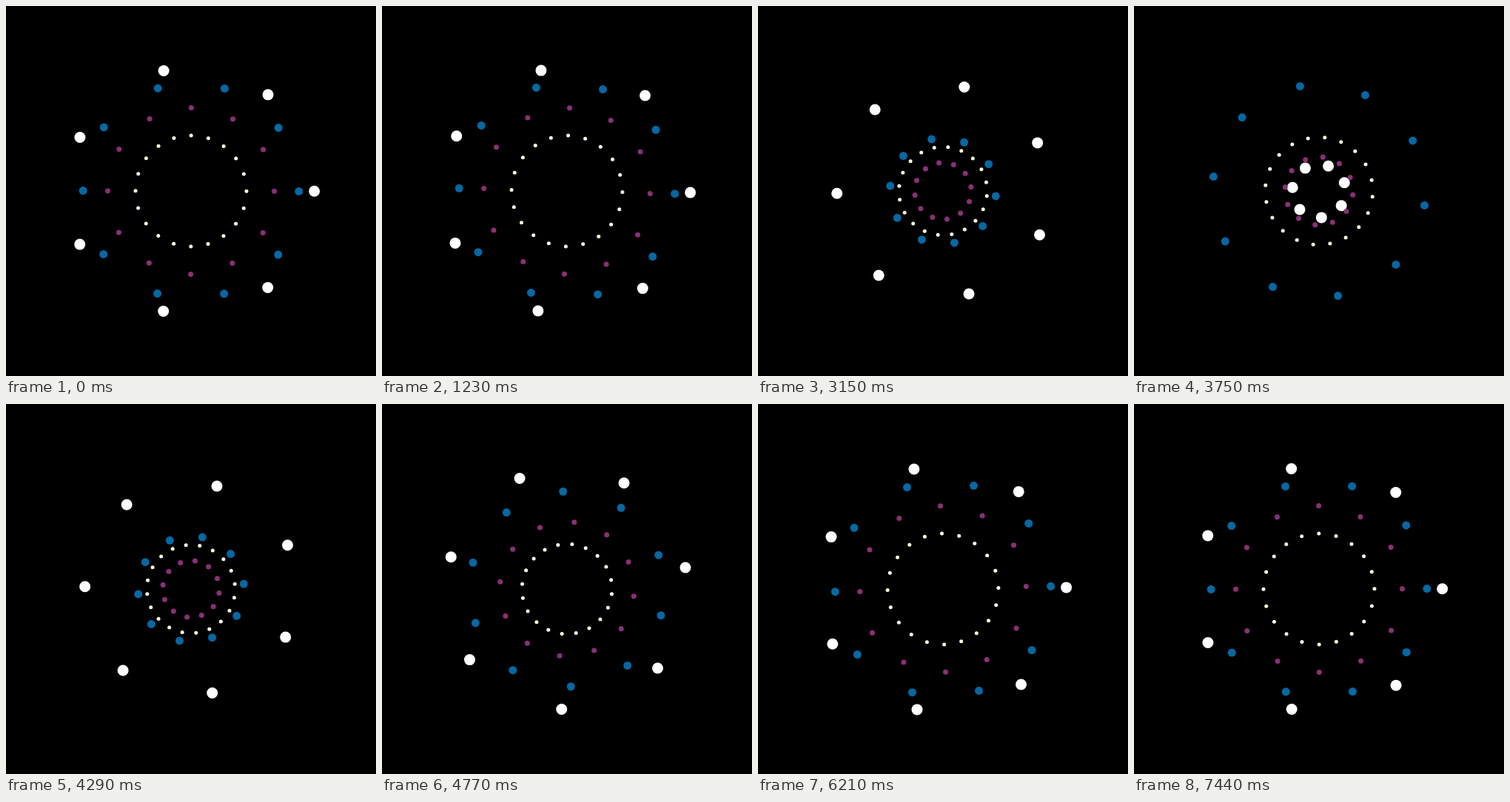
Recreate the animation shown at these times as an HTML page with a canvas. Size 500 px wide and 500 px high, loop 7.5 s.

```html
<!DOCTYPE html>
<html lang="en">
<head>
<meta charset="utf-8">
<title>Orbiting rings</title>
<style>
  html, body { margin: 0; width: 100%; height: 100%; overflow: hidden; background: #000; }
  canvas { display: block; width: 500px; height: 500px; }
</style>
</head>
<body>
<canvas id="stage" width="500" height="500"></canvas>
<script>
const ctx = document.getElementById('stage').getContext('2d');
const TAU = Math.PI * 2;
const LOOP = 7500;
const STEP = 30;
const STEPS = LOOP / STEP;

// Each dot circles a hub; the hubs sit evenly on a ring around the centre.
const rings = [
  { count: 7,  ring: 100,  orbit: 66.67, turns: 1, size: 7.5, color: '#ffffff' },
  { count: 10, ring: 87.5, orbit: 58.33, turns: 2, size: 5.5, color: '#0568a3' },
  { count: 12, ring: 75,   orbit: 37.5,  turns: 3, size: 3.5, color: '#8b2f76' },
  { count: 20, ring: 62.5, orbit: 12.5,  turns: 4, size: 2.5, color: '#ffffdd' }
];

function easeInOutExpo(p) {
  return p < 0.5 ? 2 ** (20 * p - 11) : 1 - 2 ** (9 - 20 * p);
}

function drawRing({ count, ring, orbit, turns, size, color }, progress) {
  const phase = TAU * turns * progress;
  const x = ring + orbit * Math.cos(phase);
  const y = orbit * Math.sin(phase);
  ctx.fillStyle = color;
  for (let i = 0; i < count; i++) {
    const a = TAU * i / count;
    const c = Math.cos(a), s = Math.sin(a);
    ctx.beginPath();
    ctx.arc(250 + x * c - y * s, 250 + x * s + y * c, size, 0, TAU);
    ctx.fill();
  }
}

function draw(time) {
  // The last step is held twice as long as the others.
  const step = Math.min(Math.floor((time % LOOP) / STEP) + 1, STEPS - 1);
  const progress = easeInOutExpo(step / STEPS);
  ctx.fillStyle = '#000';
  ctx.fillRect(0, 0, 500, 500);
  for (const ring of rings) drawRing(ring, progress);
}

const start = performance.now();
function tick() {
  draw(performance.now() - start);
  requestAnimationFrame(tick);
}
tick();
</script>
</body>
</html>
```
